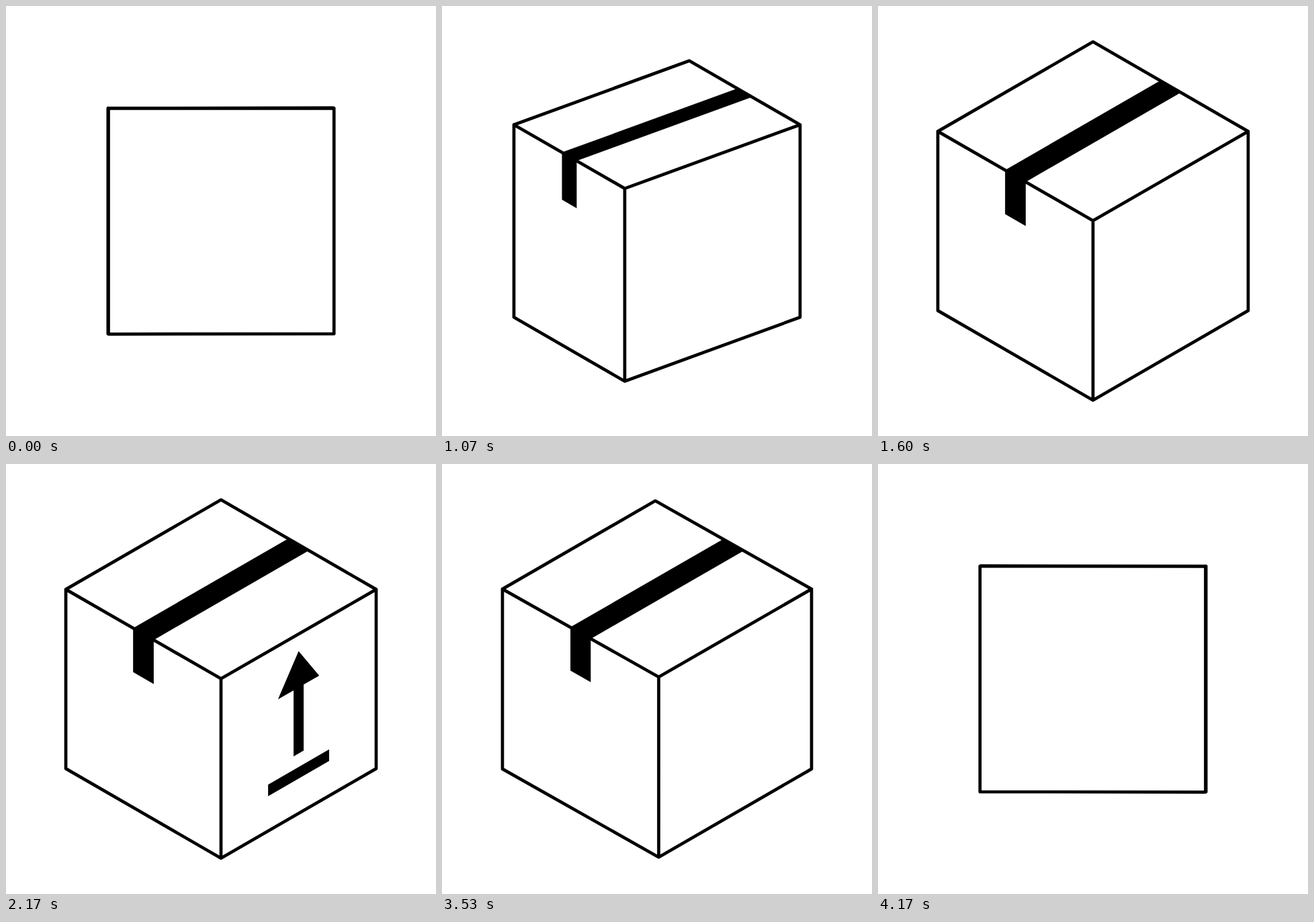
Write an HTML page that moves like this. It is 640 by 640 pixels and loops after 4260 ms.

```html
<!DOCTYPE html>
<html lang="en">
<head>
<meta charset="utf-8">
<title>Parcel</title>
<style>
  html, body { margin: 0; width: 100%; height: 100%; overflow: hidden; background: #fff; }
  svg { display: block; width: 100%; height: 100%; }
</style>
</head>
<body>
<svg viewBox="0 0 640 640">
  <clipPath id="sideClip"><polygon id="side"/></clipPath>
  <g clip-path="url(#sideClip)"><path id="arrow"/></g>
  <polygon id="tape"/>
  <path id="edges" fill="none" stroke="#000" stroke-width="4.7" stroke-linejoin="round" stroke-linecap="round"/>
</svg>
<script>
const LOOP = 4260;
const CENTER = 320;
const HALF = 168;            // half the side of the flat square
const RADIUS = 266.7;        // hexagon radius of the fully turned box
const TAPE_HALF = 0.0665;    // half the tape width, as a share of the edge
const TAPE_HANG = 0.246;     // tape flap, as a share of the box height
const ARROW_TRAVEL = 221;
const SLOPE = Math.tan(Math.PI / 6);

const byId = id => document.getElementById(id);
const side = byId('side'), arrow = byId('arrow'), tape = byId('tape'), edges = byId('edges');

const lerp = (a, b, k) => a + (b - a) * k;
const between = (p, q, k) => [lerp(p[0], q[0], k), lerp(p[1], q[1], k)];
const progress = (t, start, end) => Math.min(1, Math.max(0, (t - start) / (end - start)));
const cubicIn = x => x ** 3;
const cubicOut = x => 1 - cubicIn(1 - x);
const backIn = x => 2.70158 * x ** 3 - 1.70158 * x ** 2;
const backOut = x => 1 - backIn(1 - x);
const points = list => list.map(p => p.map(v => v.toFixed(2)).join()).join(' ');

// turn: -1 shows only the right face, 0 the corner, 1 only the left face.
function boxAt(turn) {
  const open = 1 - Math.abs(turn);
  const halfWidth = lerp(HALF, RADIUS * Math.cos(Math.PI / 6), open);
  const halfHeight = lerp(HALF, RADIUS / 2, open);
  const rise = lerp(HALF, RADIUS, open);
  const midX = CENTER + HALF * turn;
  return {
    left: [CENTER - halfWidth, CENTER - halfHeight],
    right: [CENTER + halfWidth, CENTER - halfHeight],
    mid: [midX, lerp(CENTER - HALF, CENTER - 0.5, open)],
    back: [2 * CENTER - midX, CENTER - rise],
    lowLeft: [CENTER - halfWidth, CENTER + halfHeight],
    lowRight: [CENTER + halfWidth, CENTER + halfHeight],
    lowMid: [midX, CENTER + rise]
  };
}

function tapeOn({ left, mid, right, back, lowLeft }) {
  const hang = (lowLeft[1] - left[1]) * TAPE_HANG;
  const [near, far] = [0.5 - TAPE_HALF, 0.5 + TAPE_HALF];
  const a = between(left, mid, near), b = between(left, mid, far);
  return [between(back, right, near), between(back, right, far),
    b, [b[0], b[1] + hang], [a[0], a[1] + hang], a];
}

// While the box closes, the tape shrinks to the middle of the top edge.
function tapeAt(turn, box) {
  if (turn <= 0) return tapeOn(box);
  return tapeOn(boxAt(0)).map(p => between(p, [CENTER, CENTER - HALF], turn));
}

function draw(t) {
  const opened = cubicOut(progress(t, 780, 1630));
  const closed = cubicIn(progress(t, 3324, 4158));
  const turn = Math.max(-0.997, Math.min(0.997, opened - 1 + closed));

  const box = boxAt(turn);
  const { left, mid, right, back, lowLeft, lowMid, lowRight } = box;
  edges.setAttribute('d',
    `M${points([left, back, right, lowRight, lowMid, lowLeft])}Z` +
    `M${points([left, mid, right])}M${points([mid, lowMid])}`);
  tape.setAttribute('points', points(tapeAt(turn, box)));
  side.setAttribute('points', points([mid, right, lowRight, lowMid]));

  const drop = 1 - backOut(progress(t, 1700, 2640)) + backIn(progress(t, 2835, 3320));
  arrow.setAttribute('display', drop < 1 ? 'inline' : 'none');
  arrow.setAttribute('transform', `matrix(1 ${-SLOPE} 0 1 435.5 ${drop * ARROW_TRAVEL})`);
}

arrow.setAttribute('d',
  'M0 298L30.7 352H7.5V450.3H-7.5V352H-30.7ZM-45.4 470.3H45.4V487.7H-45.4Z');

let begin;
function tick(now) {
  begin ??= now;
  draw((now - begin) % LOOP);
  requestAnimationFrame(tick);
}
draw(0);
requestAnimationFrame(tick);
</script>
</body>
</html>
```
